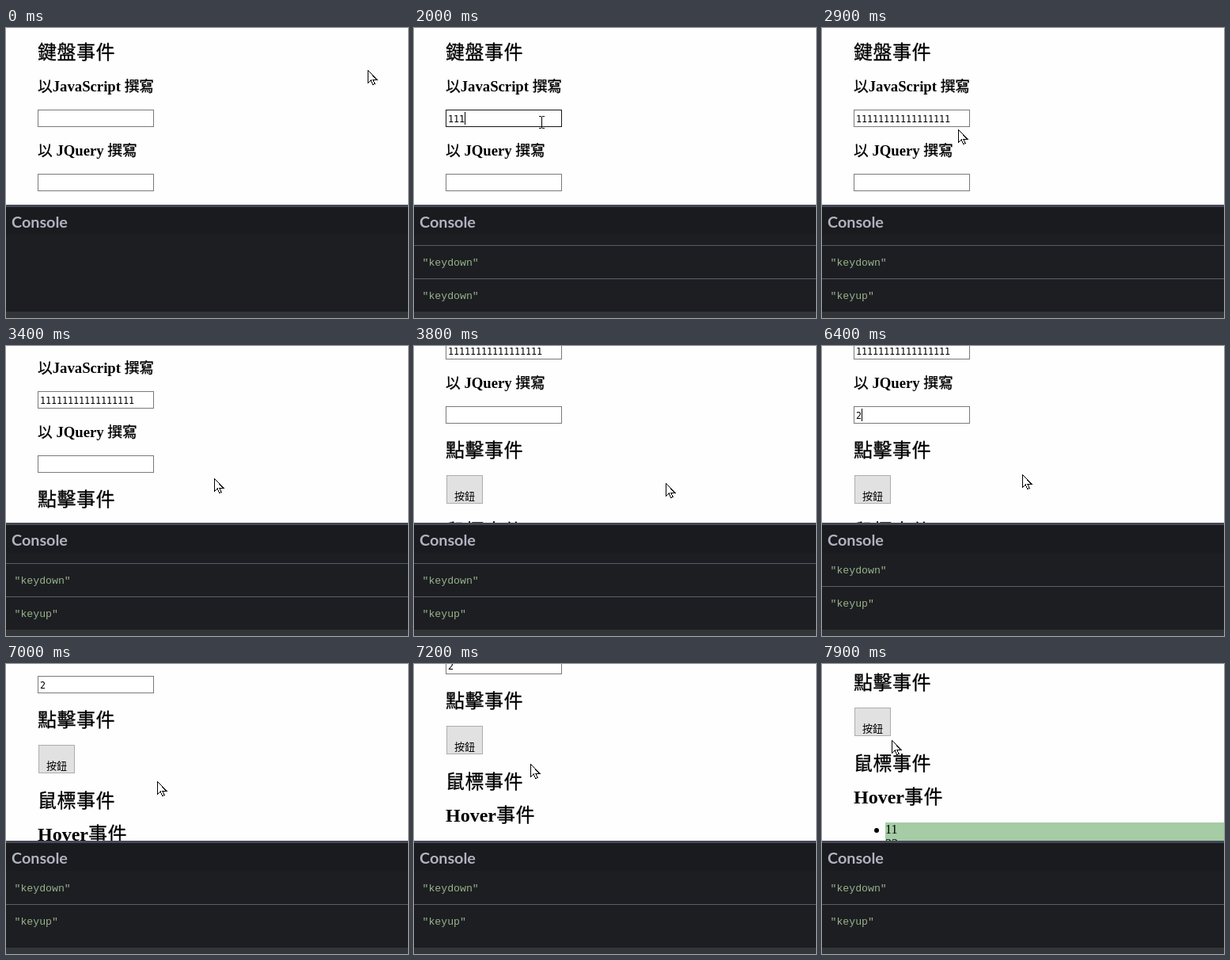
An HTML page that plays this animation: 508 by 366 pixels, repeating every 8 s.

```html
<!DOCTYPE html>
<html lang="zh-Hant">
<head>
<meta charset="utf-8">
<title>鍵盤事件</title>
<style>
  html, body { margin: 0; width: 100%; height: 100%; overflow: hidden; background: #fefefe; }
  svg { display: block; width: 508px; height: 366px; }
  text { white-space: pre; }
  .h2, .h3 { font-family: "Liberation Serif", "Noto Sans CJK TC", "Noto Sans CJK", serif; font-weight: bold; }
  .h2 { font-size: 24px; }
  .h3 { font-size: 18.72px; }
  /* regular Han glyphs, lightly emboldened */
  .han { font-weight: 400; stroke: #000; stroke-width: .3px; }
  .h2 .han, .h2.han { letter-spacing: .5px; }
  .item { font: 16px "Liberation Serif", serif; }
  .label { font: 13px "Noto Sans CJK TC", "Noto Sans CJK", sans-serif; }
  .value { font: 11.63px "DejaVu Sans Mono", monospace; }
  .log { font: 13.2px "Liberation Mono", monospace; fill: #96b38a; }
  .title { font: bold 19.8px Lato, sans-serif; fill: #b0b3c0; }
  .field { fill: #fff; stroke: #7a7a7a; }
  .field.hover { stroke: #171717; }
  .button { fill: #e1e1e1; stroke: #adadad; }
  .button.hover { fill: #e5f1fb; stroke: #0078d7; }
  #arrow, #beam { shape-rendering: crispEdges; }
</style>
</head>
<body>
<svg viewBox="0 0 508 366">
  <rect width="508" height="366" fill="#fefefe"/>
  <g id="page">
    <text class="h2 han" x="40" y="39">鍵盤事件</text>
    <text class="h3" x="40" y="80"><tspan class="han">以</tspan>JavaScript <tspan class="han">撰寫</tspan></text>
    <rect class="field" id="field1" x="40.5" y="103.5" width="146" height="21"/>
    <text class="value" id="value1" x="43" y="119"></text>
    <rect id="caret1" y="106" width="1" height="16"/>
    <text class="h3" x="40" y="161"><tspan class="han">以</tspan> JQuery <tspan class="han">撰寫</tspan></text>
    <rect class="field" id="field2" x="40.5" y="184.5" width="146" height="21"/>
    <text class="value" id="value2" x="43" y="200"></text>
    <rect id="caret2" y="187" width="1" height="16"/>
    <text class="h2 han" x="40" y="248">點擊事件</text>
    <rect class="button" id="button" x="41.5" y="271.5" width="45" height="35"/>
    <text class="label" x="51" y="302">按鈕</text>
    <text class="h2 han" x="40" y="350">鼠標事件</text>
    <text class="h2" x="40" y="392">Hover<tspan class="han">事件</tspan></text>
    <rect x="80" y="416" width="428" height="60" fill="#a5cca5"/>
    <circle cx="69" cy="426" r="3"/>
    <text class="item" x="80" y="430">11</text>
    <text class="item" x="80" y="448">22</text>
  </g>
  <g id="arrow">
    <path d="M.5 .5V16.5L4.2 13L6.7 18.5L9 17.5L6.6 12H11.5Z" fill="#fff" stroke="#000"/>
  </g>
  <path id="beam" d="M-3 -7.5H0M1 -7.5H4M.5 -7V7M-3 7.5H0M1 7.5H4" fill="none" stroke="#000"/>
  <rect y="223" width="508" height="143" fill="#1d1e22"/>
  <g id="logs">
    <path id="line1" d="M0 261.5H508" stroke="#565a6a"/>
    <path id="line2" d="M0 303.5H508" stroke="#5c5f69"/>
    <text class="log" id="log1" x="10.5" y="287"></text>
    <text class="log" id="log2" x="10.5" y="329"></text>
  </g>
  <rect y="223" width="508" height="3" fill="#444857"/>
  <rect y="226" width="508" height="35" fill="#1a1b1f"/>
  <text class="title" x="7" y="252">Console</text>
  <rect y="358" width="508" height="8" fill="#323639"/>
</svg>
<script>
const LOOP = 8000, STEP = 100;
const el = {};
document.querySelectorAll('[id]').forEach(n => el[n.id] = n);

// [time, x, y, shape]; the shape holds until the next entry
const pointer = [
  [0, 457, 53, 'arrow'], [400, 161, 119, 'beam'], [2800, 161, 119, 'beam'],
  [2900, 172, 128, 'arrow'], [3200, 276, 160, 'arrow'], [3400, 263, 167, 'arrow'],
  [3700, 174, 99, 'beam'], [3800, 318, 173, 'arrow'], [3900, 479, 181, 'arrow'],
  [4000, 530, 185, 'arrow'], [4600, 530, 190, 'arrow'], [4700, 479, 190, 'arrow'],
  [4800, 318, 173, 'arrow'], [4900, 180, 157, 'arrow'], [5000, 106, 122, 'beam'],
  [5200, 114, 87, 'beam'], [5800, 114, 87, 'beam'], [6000, 125, 115, 'beam'],
  [6100, 150, 125, 'arrow'], [6400, 253, 162, 'arrow'], [6500, 257, 163, 'arrow'],
  [6600, 253, 162, 'arrow'], [6800, 217, 165, 'arrow'], [6900, 197, 165, 'arrow'],
  [7000, 191, 148, 'arrow'], [7400, 103, 103, 'arrow'], [7500, 103, 103, 'arrow'],
  [7600, 84, 84, 'arrow'], [7800, 78, 80, 'arrow'], [7900, 88, 96, 'arrow']
];
const scroll = [
  [0, 0], [3200, 0], [3400, 46], [3600, 92], [3700, 108],
  [6600, 108], [7000, 169], [7400, 216]
];
const blink1 = [[600, 1000], [1500, 2900], [4400, 4800]];
const blink2 = [[5300, 6500]];

function at(keys, t, col) {
  const i = keys.findLastIndex(k => k[0] <= t);
  const a = keys[i], b = keys[i + 1] || a;
  const p = b === a ? 0 : (t - a[0]) / (b[0] - a[0]);
  return Math.round(a[col] + (b[col] - a[col]) * p);
}
const within = (spans, t) => spans.some(([a, b]) => t >= a && t < b);
const show = (node, on) => node.setAttribute('visibility', on ? 'visible' : 'hidden');
const move = (node, x, y) => node.setAttribute('transform', `translate(${x} ${y})`);

function ones(t) {
  if (t < 1600) return 0;
  return t < 2000 ? 1 : Math.min(17, 3 + 2 * (t - 2000) / STEP);
}

function entries(t) {
  if (t < 4600) {
    const list = Array(ones(t)).fill('keydown');
    return t >= 2800 ? [...list, 'keyup'] : list;
  }
  return t < 5700 ? [] : t < 5800 ? ['keydown'] : ['keydown', 'keyup'];
}

function setField(n, value, caretOn) {
  el['value' + n].textContent = value;
  el['caret' + n].setAttribute('x', 43 + 7 * value.length);
  show(el['caret' + n], caretOn);
}

function draw(t) {
  const top = at(scroll, t, 1);
  move(el.page, 0, -top);
  setField(1, '1'.repeat(ones(t)), within(blink1, t));
  setField(2, t < 5700 ? '' : '2', within(blink2, t));

  const x = at(pointer, t, 1), y = at(pointer, t, 2);
  const shape = pointer.findLast(k => k[0] <= t)[3];
  for (const name of ['arrow', 'beam']) {
    show(el[name], name === shape);
    move(el[name], x, y);
  }
  for (const name of ['field1', 'field2', 'button']) {
    const b = el[name].getBBox();
    const dx = x - b.x, dy = y + top - b.y;
    el[name].classList.toggle('hover', dx >= 0 && dx <= b.width && dy >= 0 && dy <= b.height);
  }

  const list = entries(t), full = list.length > 2;
  const [first, second] = list.slice(-2);
  const quote = s => s ? `"${s}"` : '';
  el.log1.textContent = quote(first);
  el.log2.textContent = quote(second);
  show(el.line1, full);
  show(el.line2, list.length > 1);
  move(el.logs, 0, full ? 13 : 0);
}

const start = performance.now();
function tick() {
  const t = (performance.now() - start) % LOOP;
  draw(Math.floor(t / STEP) * STEP);
  requestAnimationFrame(tick);
}
tick();
</script>
</body>
</html>
```
